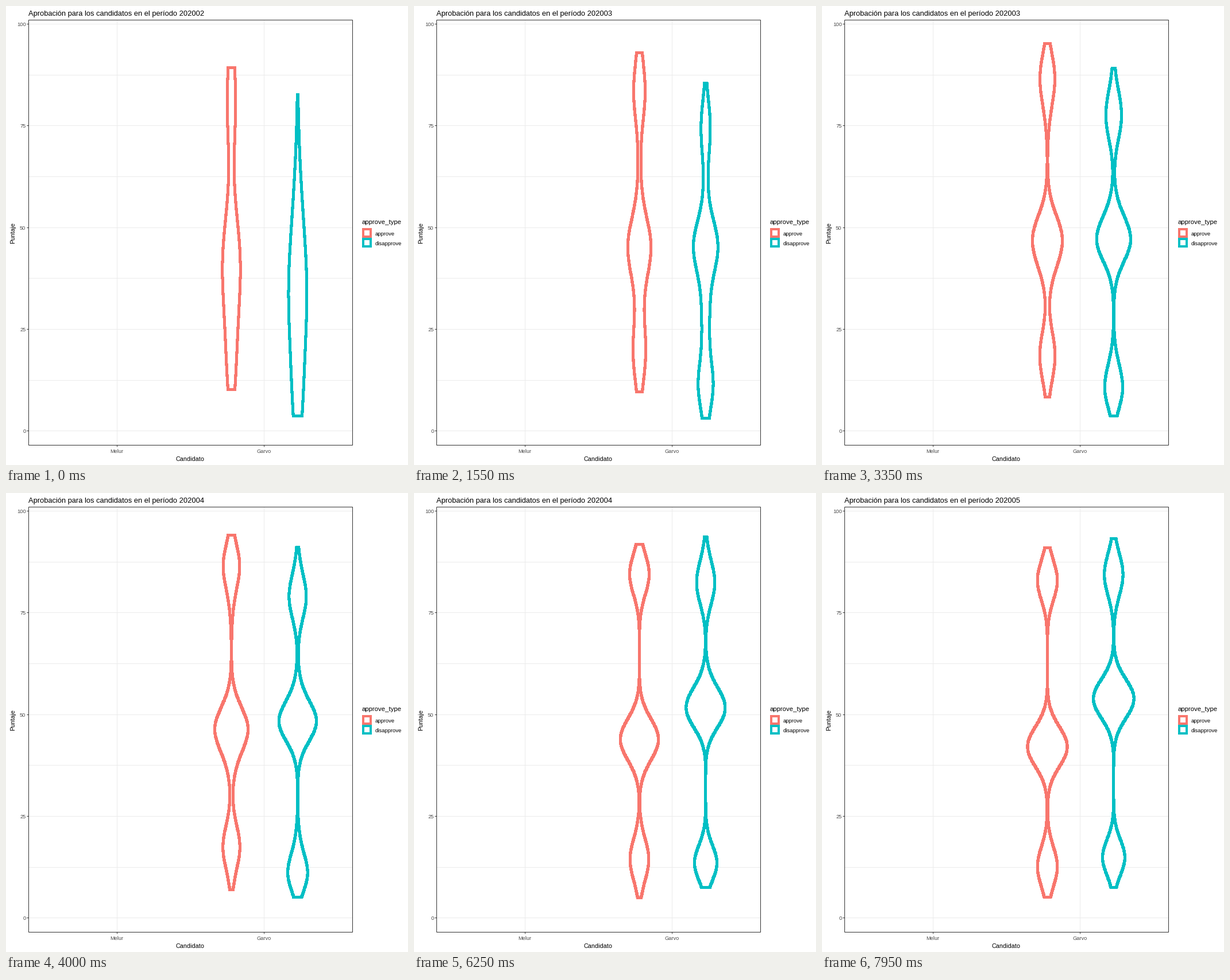
Write a matplotlib script that moves like this. It is 700 px wide and 800 px high and loops after 8 s.

```python
import numpy as np
import matplotlib.pyplot as plt
from matplotlib.animation import FuncAnimation
from matplotlib.patches import Polygon, Rectangle

W, H, DPI = 700, 800, 100
PX = 72 / DPI  # points per pixel
FRAMES, STEP_MS = 160, 50
CYCLE, HOLD = 50, 8  # frames per period, frames at rest

RED, TEAL = "#F8766D", "#00BFC4"
GRID, DARK, GREY = "#EBEBEB", "#333333", "#4D4D4D"
LEFT, RIGHT, TOP, BOTTOM = 39.5, 603.5, 24.5, 765.5
UNIT = 7.092  # pixels per score point
AREA = 600    # area of half a single poll cluster, in square pixels

# Per period: lowest score, three cluster means, highest score, mean spread
APPROVE = [
    (10.2, 18.4, 41.7, 81.2, 89.3, 11.7),
    (9.2, 19.1, 46.6, 86.1, 95.9, 6.9),
    (5.0, 15.6, 45.1, 85.5, 92.4, 5.0),
    (5.1, 12.6, 42.1, 83.0, 91.0, 4.9),
]
DISAPPROVE = [
    (3.7, 8.5, 32.5, 52.3, 82.7, 13.5),
    (2.6, 10.9, 46.6, 76.9, 87.9, 6.1),
    (7.5, 12.8, 50.6, 81.5, 94.0, 4.5),
    (7.5, 14.9, 53.9, 84.4, 93.2, 4.8),
]


def to_y(score):
    return 740.3 - UNIT * score


def outline(low, *means, skew):
    """Scores and half widths: a density of three clusters weighted 1:2:1."""
    *means, high, spread = means
    score = np.linspace(low, high, 512)
    half = np.zeros_like(score)
    for side, mean in zip((-1, 0, 1), means):
        sd = spread * (1 + side * skew)
        peak = AREA * (2 - abs(side)) / (sd * UNIT)
        half += peak * np.exp(-0.5 * ((score - mean) / sd) ** 2)
    return np.array([score, half])


def polygon(center, score, half):
    """Closed contour on whole pixels."""
    xs = np.concatenate([center - half, center + half[::-1]])
    ys = to_y(np.concatenate([score, score[::-1]]))
    return np.round(np.column_stack([xs, ys])) + 0.5


fig = plt.figure(figsize=(W / DPI, H / DPI), dpi=DPI, facecolor="white")
ax = fig.add_axes([0, 0, 1, 1])
ax.set(xlim=(0, W), ylim=(H, 0))
ax.axis("off")


def line(x0, y0, x1, y1, color):
    ax.plot([x0, x1], [y0, y1], color=color, lw=PX, zorder=1,
            snap=False, solid_capstyle="butt")


def box(x, y, w, h, color, width, **kw):
    ax.add_patch(Rectangle((x, y), w, h, ec=color, lw=width * PX,
                           joinstyle="miter", snap=False, **kw))


def text(x, y, label, size, color="black", **kw):
    return ax.text(x, y, label, fontsize=size * PX, color=color,
                   family="Liberation Sans", va="baseline", **kw)


# Panel: grid, ticks, border
for score in np.arange(0, 101, 12.5):
    y = round(to_y(score)) + 0.5
    line(LEFT, y, RIGHT, y, GRID)
    if score % 25 == 0:
        line(LEFT - 3, y, LEFT, y, DARK)
        text(34.5, y + 3.8, f"{score:.0f}", 9.3, GREY, ha="right")
for x, name in ((193.5, "Melur"), (449.5, "Garvo")):
    line(x, TOP, x, BOTTOM, GRID)
    line(x, BOTTOM, x, BOTTOM + 3, DARK)
    text(x - 0.8, 779.3, name, 9.3, GREY, ha="center")
box(LEFT, TOP, RIGHT - LEFT, BOTTOM - TOP, DARK, 1, fill=False, zorder=5)

# Titles and legend
title = text(39, 17, "", 12.95)
text(321, 793, "Candidato", 10.8, ha="center")
text(15, 395.5, "Puntaje", 10.8, ha="center", rotation=90, rotation_mode="anchor")
text(620, 380, "approve_type", 11.4)
for y, color, label in ((387, RED, "approve"), (404, TEAL, "disapprove")):
    box(622, y + 2, 13, 13, color, 4, fc="white")
    text(643, y + 13, label, 9.5)

violins = []
for center, color, periods, skew in ((392, RED, APPROVE, 0),
                                     (507.4, TEAL, DISAPPROVE, 0.09)):
    shapes = [outline(*p, skew=skew) for p in periods]
    patch = Polygon(polygon(center, *shapes[0]), closed=True, fc="white", ec=color,
                    lw=5 * PX, joinstyle="round", zorder=3,
                    snap=False, antialiased=False)
    violins.append((ax.add_patch(patch), center, shapes))


def update(frame):
    cycle, step = divmod(frame, CYCLE)
    stage = min(cycle + max(0, step - HOLD) / (CYCLE - HOLD), 3)
    k = min(int(stage), 2)
    t = stage - k
    for patch, center, shapes in violins:
        patch.set_xy(polygon(center, *((1 - t) * shapes[k] + t * shapes[k + 1])))
    period = 202002 + int(stage + 0.5)
    title.set_text(f"Aprobación para los candidatos en el período {period}")
    return [v[0] for v in violins] + [title]


anim = FuncAnimation(fig, update, frames=FRAMES, interval=STEP_MS,
                     repeat=True, repeat_delay=0, blit=False)
plt.show()
```
